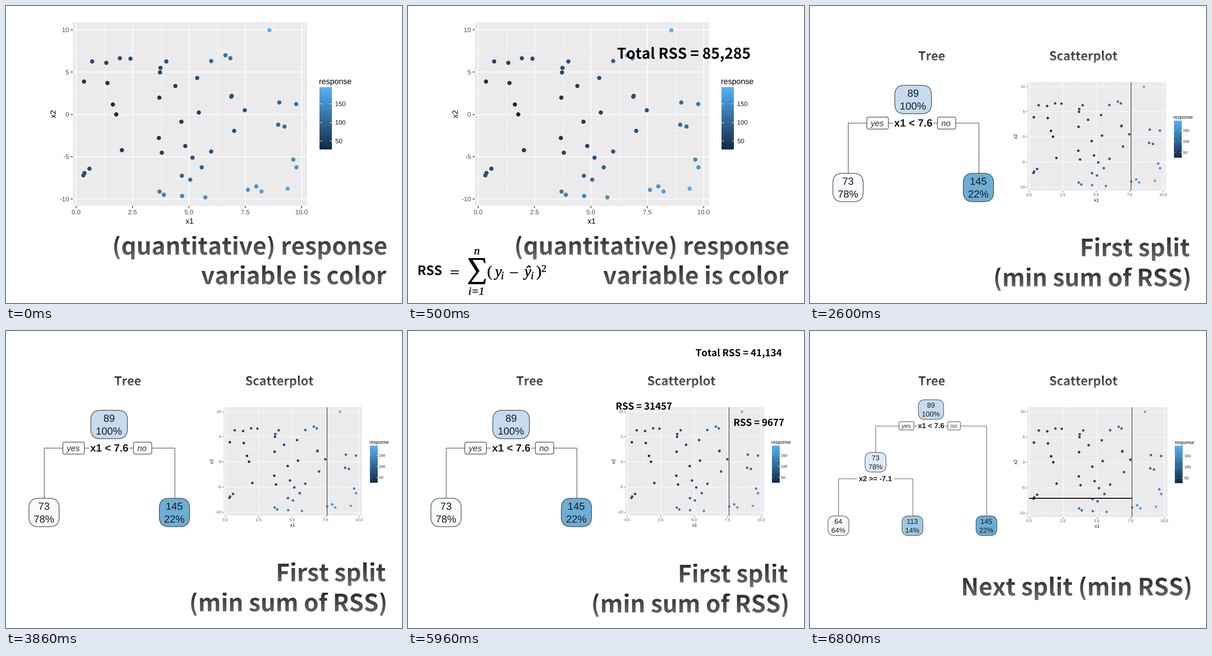
Animation, 864 px wide and 648 px high, one loop 8 s. Source, as a matplotlib script:

```python
import numpy as np
import matplotlib.pyplot as plt
from matplotlib.animation import FuncAnimation
from matplotlib.colors import LinearSegmentedColormap
from matplotlib.patches import FancyBboxPatch, PathPatch, Polygon, Rectangle
from matplotlib.textpath import TextPath
from matplotlib.transforms import Affine2D

WIDTH, HEIGHT, DPI = 864, 648, 72  # at 72 dpi one point is one pixel
STEP, LOOP = 100, 8000
CUTS = [500, 2600, 4700, 6800]

HEADING = dict(family="Noto Sans CJK JP", weight="bold")
SANS = dict(family="Liberation Sans")
BOLD = dict(family="Liberation Sans", weight="bold")
SLANTED = dict(family="Liberation Sans", style="italic")
MATH = dict(family="Liberation Serif")
MATH_ITALIC = dict(family="Liberation Serif", style="italic")

BLUES = LinearSegmentedColormap.from_list("blues", ["#132B43", "#56B1F7"])
INK = LinearSegmentedColormap.from_list("ink", ["#2b2b2b", "#72726c"])
LOW, HIGH = 27, 194

POINTS = np.array([
    (.71, 6.26), (1.34, 6.10), (1.94, 6.64), (2.41, 6.59), (.35, 3.88),
    (1.39, 3.71), (1.63, 1.17), (1.78, 0), (2.03, -4.23), (.59, -6.42),
    (.37, -6.94), (.32, -7.21), (3.74, 5.50), (4.00, 6.26), (3.72, 4.96),
    (4.40, 3.36), (3.69, 1.98), (5.37, 4.31), (5.44, .22), (4.67, -.87),
    (3.67, -2.79), (3.80, -4.53), (4.84, -3.74), (5.16, -5.12), (5.57, -6.26),
    (5.99, -4.39), (4.69, -7.26), (5.06, -7.72), (3.70, -9.13), (3.89, -9.51),
    (4.70, -9.65), (5.73, -9.81), (5.99, 6.31), (6.62, 6.99), (6.84, 6.64),
    (6.90, 2.20), (6.88, 2.09), (7.48, .49), (7.01, -1.95), (9.01, 1.41),
    (9.76, 1.22), (8.96, -1.22), (9.24, -1.44), (9.63, -5.34), (9.77, -6.26),
    (7.99, -8.51), (7.62, -8.92), (8.22, -9.11), (9.38, -8.78), (8.57, 9.95)])
RESPONSE = (POINTS ** 2).sum(axis=1) + 24


def outline(s, x, y, size, font, align, turn=0):
    path = TextPath((0, 0), s, size=size, prop=font)
    box = path.get_extents()
    place = Affine2D().translate(-box.x0 - align * box.width, 0).scale(1, -1)
    return place.rotate_deg(turn).translate(x, y).transform_path(path)


def text(ax, s, x, y, size, font=SANS, align=0.5, color="black", turn=0, weight=0):
    path = outline(s, x, y, size, font, align, turn)
    ax.add_patch(PathPatch(path, facecolor=color, edgecolor=color, lw=weight, zorder=5))


def gradient_text(ax, s, x, y, size, align):
    path = outline(s, x, y, size, HEADING, align)
    box = path.get_extents()
    shade = ax.imshow(np.linspace(0, 1, 64)[:, None], cmap=INK, aspect="auto",
                      interpolation="bilinear", zorder=4,
                      extent=(box.x0 - 1, box.x1 + 1, y + .2 * size, y - .78 * size))
    shade.set_clip_path(path, ax.transData)


def line(ax, xs, ys, color, lw, zorder=2):
    ax.plot(xs, ys, color=color, lw=lw, zorder=zorder, solid_capstyle="butt",
            solid_joinstyle="miter")


def rounded(ax, x, y, w, h, radius, fill, lw):
    style = f"round,pad=0,rounding_size={radius}"
    ax.add_patch(FancyBboxPatch((x, y), w, h, boxstyle=style, facecolor=fill,
                                edgecolor="#3c3c3c", lw=lw, zorder=3))


def scatterplot(ax, left, top, k, x_split=None, y_split=None):
    right, bottom = left + 510.5 * k, top + 400.5 * k
    middle = (top + bottom) / 2

    def px(v):
        return left + (7 + 49.2 * v) * k

    def py(v):
        return top + (201.5 - 18.45 * v) * k

    ax.add_patch(Rectangle((left, top), right - left, bottom - top, fc="#EBEBEB", lw=0, zorder=1))
    for v in (1.25, 3.75, 6.25, 8.75):
        line(ax, [px(v)] * 2, [top, bottom], "white", .8 * k)
    for v in (-7.5, -2.5, 2.5, 7.5):
        line(ax, [left, right], [py(v)] * 2, "white", .8 * k)
    for v in (0, 2.5, 5, 7.5, 10):
        line(ax, [px(v)] * 2, [top, bottom], "white", 1.7 * k)
        line(ax, [px(v)] * 2, [bottom, bottom + 5 * k], "#333333", 1.5 * k)
        text(ax, f"{v:.1f}", px(v), bottom + 19 * k, 14 * k, color="#4d4d4d")
    for v in (-10, -5, 0, 5, 10):
        line(ax, [left, right], [py(v)] * 2, "white", 1.7 * k)
        line(ax, [left - 5 * k, left], [py(v)] * 2, "#333333", 1.5 * k)
        text(ax, str(v), left - 9 * k, py(v) + 5 * k, 14 * k, align=1, color="#4d4d4d")
    text(ax, "x1", (left + right) / 2 - k, bottom + 39.5 * k, 16.8 * k)
    text(ax, "x2", left - 37.5 * k, middle + k, 16.8 * k, turn=-90)

    ax.scatter(px(POINTS[:, 0]), py(POINTS[:, 1]), s=(9.2 * k) ** 2, c=RESPONSE,
               cmap=BLUES, vmin=LOW, vmax=HIGH, linewidths=0, zorder=3)
    if x_split is not None:
        line(ax, [px(x_split)] * 2, [top, bottom], "#333333", 1.3, 4)
    if y_split is not None:
        line(ax, [px(0), px(x_split)], [py(y_split)] * 2, "black", 2, 4)

    bar, wide = right + 27.5 * k, 27 * k
    text(ax, "response", bar, middle - 65 * k, 17.3 * k, align=0)
    ax.imshow(np.linspace(1, 0, 128)[:, None], cmap=BLUES, aspect="auto", zorder=2,
              extent=(bar, bar + wide, middle + 78 * k, middle - 58 * k))
    for value in (150, 100, 50):
        y = middle + (18.5 - .81 * (value - 100)) * k
        for x in (bar, bar + wide - 5 * k):
            line(ax, [x, x + 5 * k], [y, y], "white", 1.1 * k, 3)
        text(ax, str(value), bar + 35 * k, y + 5 * k, 13.8 * k, align=0, color="#1a1a1a")


def node(ax, x, top, k, mean, share, fill, w=66):
    rounded(ax, x - w * k / 2, top, w * k, 62 * k, 21 * k, fill, .6 + .7 * k)
    text(ax, mean, x, top + 25 * k, 22.4 * k, color="#1a1a1a")
    text(ax, share, x, top + 53 * k, 22.4 * k, color="#1a1a1a")


def split(ax, x, y, k, rule, left, right, gap, answers=False):
    """Each side is the (x, y) of the top of a child node."""
    for (cx, cy), edge in ((left, x - gap * k), (right, x + gap * k)):
        line(ax, [cx, cx, edge], [cy, y, y], "#555555", .6 + .7 * k)
    text(ax, rule, x, y + 8 * k, 23 * k, BOLD, color="#1a1a1a")
    if answers:
        for word, start, w in (("yes", -101, 47), ("no", 53, 40)):
            rounded(ax, x + start * k, y - 12.5 * k, w * k, 26 * k, 4 * k, "white", .6 + .7 * k)
            text(ax, word, x + (start + w / 2 - 1.5) * k, y + 7 * k, 18.4 * k, SLANTED,
                 color="#333333")


def title(ax, *rows):
    for s, x, y in rows:
        gradient_text(ax, s, x, y, 51.7, 1)


def formula(ax):
    text(ax, "RSS", 23, 587, 28, HEADING, 0)
    for y in (577.5, 584):
        line(ax, [93, 111], [y, y], "black", 2)
    sigma = [(132, 550), (168, 550), (169, 561), (166.5, 561), (163, 554), (141, 554),
             (156, 578), (138, 602), (164, 602), (167.5, 595), (170, 595), (168, 607),
             (131, 607), (131, 604.5), (149, 580), (132, 553)]
    ax.add_patch(Polygon(sigma, fc="black", lw=0))
    parts = [("n", 145, 542, 25, MATH_ITALIC), ("i=1", 133, 630, 24, MATH_ITALIC),
             ("(", 174, 590, 34, MATH), ("y", 187, 590, 34, MATH_ITALIC),
             ("i", 204, 596, 24, MATH_ITALIC), ("ŷ", 251, 590, 34, MATH_ITALIC),
             ("i", 269, 596, 24, MATH_ITALIC), (")", 281, 590, 34, MATH),
             ("2", 292, 580, 22, MATH)]
    for s, x, y, size, font in parts:
        text(ax, s, x, y, size, font, 0, weight=.5)
    line(ax, [222, 240], [582, 582], "black", 2)


def headings(ax):
    gradient_text(ax, "Tree", 237, 118.5, 26.4, 0)
    gradient_text(ax, "Scatterplot", 523, 118.5, 26.6, 0)


def intro(ax):
    scatterplot(ax, 146, 35, 1)
    title(ax, ("(quantitative) response", 830, 542.5), ("variable is color", 830, 607))


def total_error(ax):
    intro(ax)
    text(ax, "Total RSS = 85,285", 457, 115, 32.2, HEADING, 0)
    formula(ax)


def first_split(ax, drop=0):
    headings(ax)
    split(ax, 225, 255, 1, "x1 < 7.6", (83, 365), (368, 365), 44, answers=True)
    node(ax, 225, 173, 1, "89", "100%", "#C6DBEF", w=80)
    node(ax, 83, 365, 1, "73", "78%", "#F7FBFF")
    node(ax, 367.5, 365, 1, "145", "22%", "#6BAED6")
    scatterplot(ax, 474, 165.5, .594, x_split=7.6)
    title(ax, ("First split", 828, 546 + drop), ("(min sum of RSS)", 828, 611.5 + drop))


def split_errors(ax):
    first_split(ax, drop=2.5)
    text(ax, "Total RSS = 41,134", 628, 55, 20.8, HEADING, 0)
    text(ax, "RSS = 31457", 455, 171.5, 20.8, HEADING, 0)
    text(ax, "RSS = 9677", 712, 207, 20.8, HEADING, 0)


def next_split(ax):
    k = .69
    headings(ax)
    split(ax, 264, 206.5, k, "x1 < 7.6", (143, 265), (385, 404), 44, answers=True)
    split(ax, 142.5, 322, k, "x2 >= -7.1", (62, 404), (223.5, 404), 58)
    node(ax, 264, 150, k, "89", "100%", "#C6DBEF", w=80)
    node(ax, 143, 265, k, "73", "78%", "#DEEBF7")
    node(ax, 62, 403.5, k, "64", "64%", "#F7FBFF")
    node(ax, 223.5, 403.5, k, "113", "14%", "#9ECAE1")
    node(ax, 385, 403.5, k, "145", "22%", "#6BAED6")
    scatterplot(ax, 474, 165.5, .5994, x_split=7.6, y_split=-7.1)
    title(ax, ("Next split (min RSS)", 830, 577))


fig = plt.figure(figsize=(WIDTH / DPI, HEIGHT / DPI), dpi=DPI, facecolor="white")


def build(draw):
    ax = fig.add_axes([0, 0, 1, 1])
    ax.set(xlim=(0, WIDTH), ylim=(HEIGHT, 0))
    ax.autoscale(False)
    ax.axis("off")
    draw(ax)
    return ax


scenes = [build(draw) for draw in (intro, total_error, first_split, split_errors, next_split)]


def update(i):
    current = np.searchsorted(CUTS, i * STEP, side="right")
    for n, ax in enumerate(scenes):
        ax.set_visible(n == current)
    return scenes


animation = FuncAnimation(fig, update, frames=LOOP // STEP, interval=STEP,
                          repeat=True, repeat_delay=0, blit=False)
plt.show()
```
